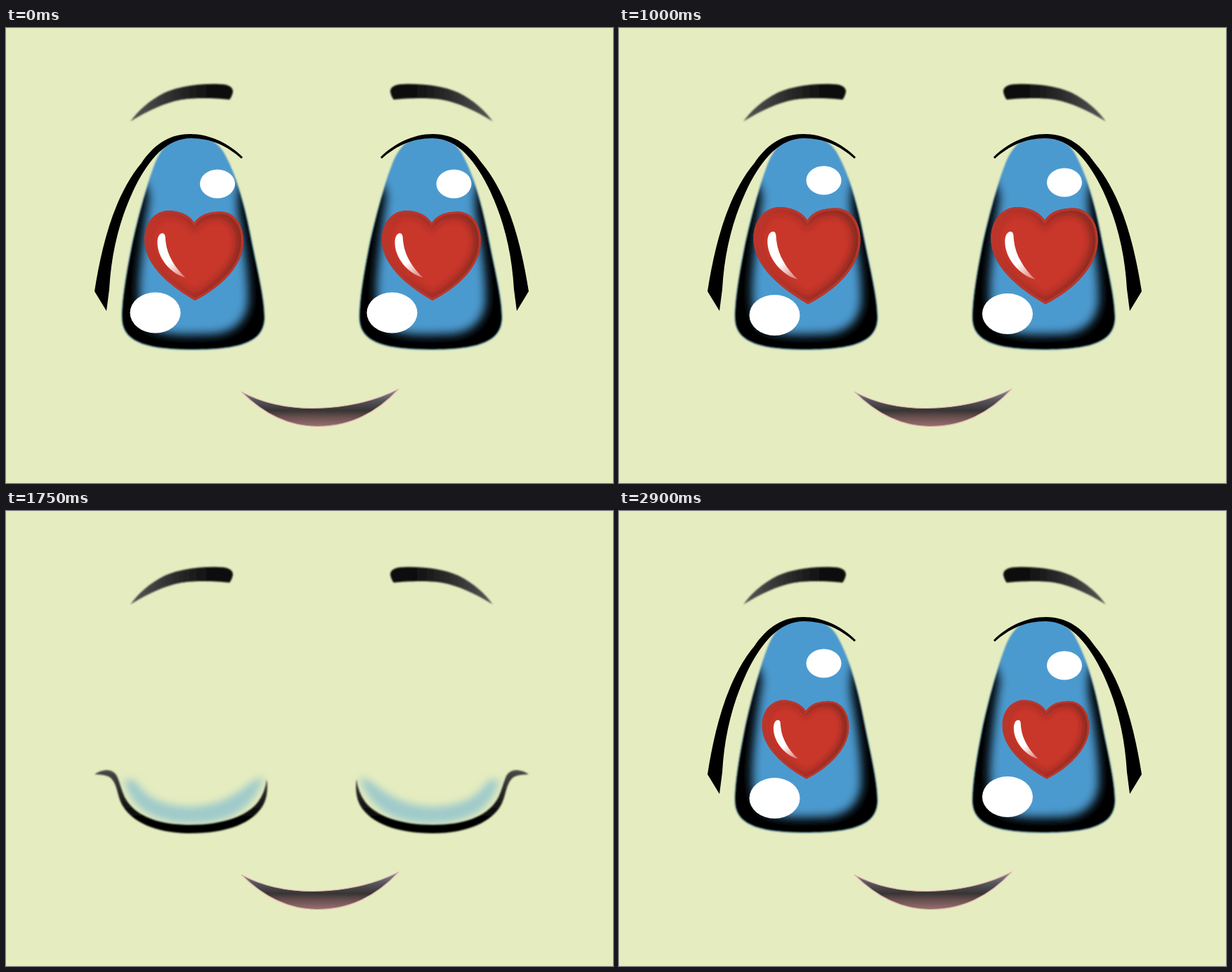
Recreate the animation shown at these times as an HTML page. Size 864x648 px, loop 3100 ms.

```html
<!DOCTYPE html>
<html lang="en">
<head>
<meta charset="utf-8">
<title>Heart eyes</title>
<style>
  html, body { margin: 0; width: 100%; height: 100%; overflow: hidden; background: #e5ecbf; }
  svg { display: block; width: 100vw; height: 100vh; }
</style>
</head>
<body>
<svg viewBox="0 0 864 648">
  <defs>
    <filter id="soft" x="-10%" y="-20%" width="120%" height="140%"><feGaussianBlur stdDeviation="1.2"/></filter>
    <filter id="crisp" x="-10%" y="-10%" width="120%" height="120%"><feGaussianBlur stdDeviation=".6"/></filter>
    <filter id="glow" x="-20%" y="-30%" width="140%" height="160%"><feGaussianBlur stdDeviation="5.5"/></filter>
    <filter id="haze" x="-20%" y="-20%" width="140%" height="140%"><feGaussianBlur stdDeviation="7"/></filter>

    <linearGradient id="browInk">
      <stop offset="0" stop-color="#555"/><stop offset=".35" stop-color="#333"/><stop offset=".85" stop-color="#080808"/>
    </linearGradient>
    <linearGradient id="lashInk" gradientUnits="userSpaceOnUse" x1="0" y1="368" x2="0" y2="440">
      <stop offset="0" stop-color="#4a4a48"/><stop offset="1" stop-color="#000"/>
    </linearGradient>
    <linearGradient id="mouthInk" gradientUnits="userSpaceOnUse" x1="0" y1="514" x2="0" y2="568">
      <stop offset="0" stop-color="#8c8f98"/><stop offset=".3" stop-color="#55555a"/>
      <stop offset=".57" stop-color="#383434"/><stop offset=".75" stop-color="#6a5150"/><stop offset="1" stop-color="#987270"/>
    </linearGradient>
    <linearGradient id="rimShade" gradientUnits="userSpaceOnUse" x1="-70" y1="0" x2="70" y2="0">
      <stop offset="0" stop-color="#7a241e" stop-opacity=".25"/><stop offset="1" stop-color="#64201b" stop-opacity=".8"/>
    </linearGradient>
    <linearGradient id="shine" gradientUnits="userSpaceOnUse" x1="-46" y1="0" x2="-18" y2="34">
      <stop offset=".35" stop-color="#fff"/><stop offset="1" stop-color="#fff" stop-opacity=".35"/>
    </linearGradient>

    <path id="heartShape" d="M.5-46C-8-60-26-63.500-36-63.500C-56-63-70.500-46-70.500-22C-70.500 12-38 42 1.500 64.500C40 45 70.500 14 70.500-20C70.500-46 56-62 38-62C22-62 8-58 .5-46Z"/>
    <clipPath id="heartClip"><use href="#heartShape"/></clipPath>
    <g id="heart">
      <use href="#heartShape" fill="#c9372b"/>
      <g clip-path="url(#heartClip)">
        <use href="#heartShape" transform="scale(.94)" fill="none" stroke="url(#rimShade)" stroke-width="11" filter="url(#glow)"/>
        <use href="#heartShape" fill="none" stroke="#b8372c" stroke-width="6"/>
      </g>
      <path d="M-52-18C-52-27-48-32-44-31C-40-30-41-25-40-18C-38 0-27 18-12 32C-32 27-52 5-52-18Z" fill="url(#shine)" filter="url(#crisp)"/>
    </g>

    <path id="irisShape" d="M262 153C285 153 301 163 310 178C330 214 341 258 350 305C358 345 368 385 368 412C368 446 337 458 266 458C196 458 165 446 165 412C165 385 172 345 180 305C189 265 199 228 212 194C222 168 239 153 262 153Z"/>
    <clipPath id="irisClip"><use href="#irisShape"/></clipPath>
    <g id="iris" filter="url(#soft)">
      <use href="#irisShape" fill="none" stroke="#4c9acf" stroke-opacity=".4" stroke-width="1.500"/>
      <g clip-path="url(#irisClip)">
        <use href="#irisShape" fill="#000"/>
        <path d="M180 120L180 205Q204 222 203 245C197 280 193 320 190 355C188 390 190 416 206 428Q224 437 262 437L295 436C328 434 345 412 345 385C345 350 339 310 334 280C328 250 326 225 348 195L348 120Z" fill="#4c9acf" filter="url(#haze)"/>
      </g>
    </g>

    <g id="brow" filter="url(#soft)">
      <path d="M177 133C188 118 204 103 226 92C248 82 280 79 304 80C317 80 323 84 323 91Q321 99 318 102C300 100 270 99 250 102C224 107 204 117 177 133Z" fill="url(#browInk)"/>
    </g>
    <path id="lid" filter="url(#crisp)" d="M337 184C317 164 290 151 262 151C232 151 210 167 193 192C153 240 136 312 126 375L143 403L147 372C150 320 161 275 181 232C200 192 226 157 263 157C292 157 315 168 335 186Z"/>
    <g id="shut">
      <path d="M168 382C178 428 215 444 262 445C310 446 350 430 367 380C345 378 332 418 262 421C215 420 195 402 184 384Z" fill="#9fcaca" filter="url(#glow)"/>
      <path d="M126 375C140 366 154 367 159 380C164 393 166 403 171 411C186 436 220 447 262 447C310 447 344 434 359 414Q369 400 371 382Q374 402 367 417C353 444 316 459 262 459C212 459 178 442 165 418C159 406 159 395 153 385C147 375 138 376 126 375Z" fill="url(#lashInk)" filter="url(#soft)"/>
    </g>
  </defs>

  <rect width="864" height="648" fill="#e5ecbf"/>
  <use href="#brow"/>
  <use href="#brow" transform="matrix(-1 0 0 1 870 0)"/>
  <path d="M335 518C365 534 397 541.500 437 541.500C480 541.500 524 532 559 514C527 549 487 567.500 443 567.500C399 567.500 364 547 335 518Z" fill="url(#mouthInk)" stroke="#e3b3b1" stroke-width="1.200" filter="url(#crisp)"/>

  <g id="open">
    <g class="eye">
      <use href="#iris"/>
      <use class="heart" href="#heart"/>
      <ellipse class="small" rx="25" ry="20.500" fill="#fff"/>
      <ellipse class="big" rx="36" ry="29" fill="#fff"/>
    </g>
    <g class="eye" transform="translate(338)">
      <use href="#iris"/>
      <use class="heart" href="#heart"/>
      <ellipse class="small" rx="25" ry="20.500" fill="#fff"/>
      <ellipse class="big" rx="36" ry="29" fill="#fff"/>
    </g>
    <use href="#lid"/>
    <use href="#lid" transform="matrix(-1 0 0 1 870 0)"/>
  </g>
  <g id="closed">
    <use href="#shut"/>
    <use href="#shut" transform="matrix(-1 0 0 1 870 0)"/>
  </g>
</svg>
<script>
  const LOOP = 3100;

  // Heart pose [x, y, scale] for the left and the right eye
  const hearts = {
    huge: [[267.5, 323.5, 1.08], [267.5, 323.5, 1.08]],
    large: [[267.5, 323.5, 1], [267.5, 323.5, 1]],
    medium: [[265.5, 325, .877], [269.5, 325, .877]],
    tiny: [[264, 323, .66], [269, 324.5, .685]]
  };

  // Glint centres per eye: resting, then shifted
  const glints = [
    { small: [[301, 222], [291.5, 217]], big: [[212.5, 405.5], [221.5, 409]] },
    { small: [[299.5, 222], [296, 220]], big: [[211.5, 405.5], [215, 407]] }
  ];

  // [start, heart size or none for a blink, glints shifted]
  const beats = [
    [0, 'large', 0], [200, 'medium', 1], [400, 'large', 0], [600, 'huge', 1],
    [800, 'medium', 0], [1000, 'huge', 1], [1200], [1350, 'large', 0],
    [1550, 'medium', 1], [1750], [1900, 'large', 0], [2100, 'tiny', 1],
    [2300, 'large', 0], [2500, 'medium', 1], [2700, 'large', 0], [2900, 'medium', 1]
  ];

  const open = document.getElementById('open');
  const closed = document.getElementById('closed');
  const eyes = [...document.querySelectorAll('.eye')];
  const place = (el, [x, y, s = 1]) =>
    el.setAttribute('transform', `translate(${x} ${y}) scale(${s})`);

  let current;
  function show(beat) {
    if (beat === current) return;
    current = beat;
    const [, size, shift] = beat;
    open.style.display = size ? '' : 'none';
    closed.style.display = size ? 'none' : '';
    if (!size) return;
    eyes.forEach((eye, i) => {
      place(eye.querySelector('.heart'), hearts[size][i]);
      for (const name of ['small', 'big'])
        place(eye.querySelector('.' + name), glints[i][name][shift]);
    });
  }

  const start = performance.now();
  function tick() {
    const t = (performance.now() - start) % LOOP;
    show(beats.filter(b => b[0] <= t).pop());
    requestAnimationFrame(tick);
  }
  tick();
</script>
</body>
</html>
```
